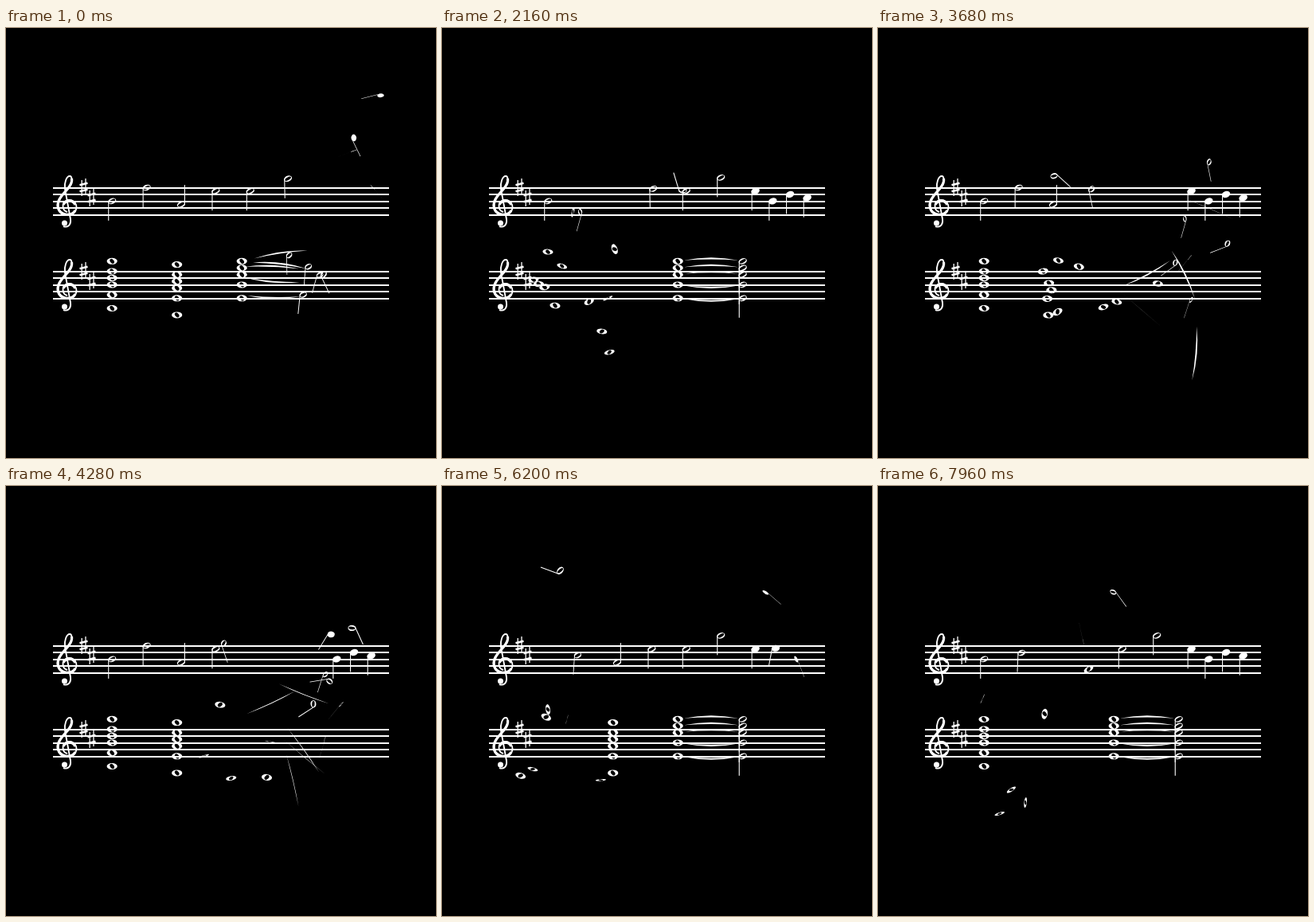
Write an HTML page with a canvas that moves like this. It is 540 by 540 pixels and loops after 8 s.

```html
<!DOCTYPE html>
<html lang="en">
<head>
<meta charset="utf-8">
<title>Scattering score</title>
<style>
  html, body { margin: 0; width: 100%; height: 100%; overflow: hidden; background: #000; }
  canvas { display: block; }
</style>
</head>
<body>
<canvas id="stage" width="540" height="540"></canvas>
<script>
const ctx = document.getElementById('stage').getContext('2d');
const LOOP = 8000, FRAME = 40;
const CYCLE = 5333, SLOT = CYCLE / 8, FIRST_LEAVE = 150;   // one pass over the two bars
const LEFT = 133.2, SLOT_WIDTH = 43.4, CHORD_WIDTH = 81.5;
const LINE_GAP = 8.45, STAFF_DROP = 105, MIDDLE = 217.4;
const parts = [];

function random(seed) {
  const v = Math.sin(seed * 127.1 + 11.7) * 43758.5453;
  return v - Math.floor(v);
}
const spread = (seed, range) => (random(seed) * 2 - 1) * range;
const stepY = (step, drop = 0) => MIDDLE + drop - step * LINE_GAP / 2;

// Parts without a drift [dx, dy, degrees] get a seeded one for each cycle.
function addPart(draw, x, y, leave, duration, reach, { turn = 0, drift } = {}) {
  parts.push({ draw, x, y, leave, duration, reach, turn, drift, id: parts.length + 1 });
}

// Quick burst outwards, a curl, one or two tumbles and a soft landing.
function poseAt({ x, y, leave, duration, reach, turn, drift, id }, time) {
  const cycle = Math.floor((time - leave) / CYCLE);
  const u = (time - leave - cycle * CYCLE) / duration;
  if (u >= 1) return [x, y, turn, 1];
  const seed = id * 3.7 + cycle * 41;
  const [dx, dy, lean] = drift ||
    [spread(seed, reach), spread(seed + .2, reach), spread(seed + .4, 100)];
  const progress = 1 - (1 - u) ** 1.6;
  const out = Math.sin(Math.PI * progress);
  const curl = Math.sin(2 * Math.PI * progress);
  const tumbles = random(seed + .6) < .5 ? 1 : 2;
  return [
    x + dx * out + spread(seed + .7, 30) * curl,
    y + dy * out + spread(seed + .8, 30) * curl,
    turn + lean * out,
    Math.cos(2 * Math.PI * tumbles * progress)
  ];
}

function oval(rx, ry, tilt) {
  ctx.moveTo(rx * Math.cos(tilt), rx * Math.sin(tilt));
  ctx.ellipse(0, 0, rx, ry, tilt, 0, Math.PI * 2);
}

function head(...ovals) {
  ctx.beginPath();
  for (const shape of ovals) oval(...shape);
  ctx.fill('evenodd');
}

function half(squash) {
  ctx.scale(squash, 1);
  head([5.3, 3.6, -.35], [4.4, 1.8, -.5]);
  ctx.fillRect(-5, 0, 1.1, 24.5);
}

function quarter(squash) {
  ctx.scale(squash, 1);
  head([5.4, 4, -.35]);
  ctx.fillRect(-5, 0, 1.1, 24.5);
}

function whole(squash) {
  ctx.scale(1, squash);
  head([6.6, 4, 0], [3.4, 2.3, .9]);
}

const tie = bulge => squash => {
  ctx.scale(1, squash);
  ctx.beginPath();
  ctx.moveTo(-34, 0);
  ctx.quadraticCurveTo(0, 7 * bulge, 34, 0);
  ctx.quadraticCurveTo(0, 2.8 * bulge, -34, 0);
  ctx.fill();
};

function melody(draw, slot, step, drift, turn = 0) {
  addPart(draw, LEFT + slot * SLOT_WIDTH, stepY(step),
    FIRST_LEAVE + slot * SLOT, 2000, 0, { turn, drift });
}

// Chords come apart from the lowest note upwards.
function chord(draw, column, steps, leave, duration, reach) {
  steps.forEach((step, i) => addPart(draw, LEFT + column * CHORD_WIDTH,
    stepY(step, STAFF_DROP), leave + (steps.length - 1 - i) * 50, duration, reach));
}

melody(half, 0, 0, [15, -112, 110]);
melody(half, 1, 4, [0, 110, 31]);
melody(half, 2, -1, [80, -20, -17], 180);
melody(half, 3, 3, [45, -60, -40]);
melody(half, 4, 3, [-90, -20, -50]);
melody(half, 5, 7, [95, -15, -25]);
melody(quarter, 6, 3, [70, -95, 100]);
melody(quarter, 6.5, 0, [62, -130, 79]);
melody(quarter, 7, 2, [45, -10, -45]);
melody(quarter, 7.5, 1, [-40, -120, -60]);

const heldSteps = [7, 5, 3, 0, -4];
[[7, 4, 2, 0, -3, -7], [6, 3, 1, -1, -4, -9], heldSteps].forEach((steps, column) =>
  chord(whole, column, steps, FIRST_LEAVE + column * 2 * SLOT, 2250, 85));
chord(half, 3, heldSteps, 2817, 3150, 70);
heldSteps.forEach((step, i) => {
  const bulge = step > 0 ? -1 : 1;
  addPart(tie(bulge), 338, stepY(step, STAFF_DROP) + bulge, 3000 - 40 * i, 2700, 95);
});

const clefLine = new Path2D('M77 231C70 229 69 218 78 216C86 215 91 223 87 230C83 237 68 236 65 226' +
  'C62 214 74 207 79 200C84 193 83 186 80 186C76 186 73 194 74 202L81 240C82 248 77 251 72 249');
const clefBody = new Path2D('M87 229C83 237 68 236 65.5 226C63 215 74 207 79 200C82 196 83 192 82.5 189' +
  'M72 222C74 217 83 214 87 222');

function sharp(x, y) {
  ctx.lineWidth = 1.3;
  ctx.beginPath();
  ctx.moveTo(x - 2.3, y - 9); ctx.lineTo(x - 2.3, y + 11);
  ctx.moveTo(x + 2.5, y - 11); ctx.lineTo(x + 2.5, y + 9);
  ctx.stroke();
  ctx.lineWidth = 2.6;
  ctx.beginPath();
  for (const dy of [-4, 4]) {
    ctx.moveTo(x - 5, y + dy + 1.3);
    ctx.lineTo(x + 5, y + dy - 1.3);
  }
  ctx.stroke();
}

function staff(drop) {
  ctx.save();
  ctx.translate(0, drop);
  for (let i = -2; i <= 2; i++) {
    ctx.fillRect(59, Math.round(MIDDLE - .8 + i * LINE_GAP), 422, 2);
  }
  ctx.lineWidth = 1.9;
  ctx.stroke(clefLine);
  ctx.lineWidth = 3.2;
  ctx.stroke(clefBody);
  ctx.beginPath();
  ctx.arc(73.5, 245, 3.5, 0, 7);
  ctx.fill();
  sharp(97.5, 200);
  sharp(107.5, 213);
  ctx.restore();
}

function render(time) {
  ctx.fillStyle = '#000';
  ctx.fillRect(0, 0, 540, 540);
  ctx.fillStyle = ctx.strokeStyle = '#fff';
  staff(0);
  staff(STAFF_DROP);
  for (const part of parts) {
    const [x, y, degrees, squash] = poseAt(part, time);
    ctx.save();
    ctx.translate(x, y);
    ctx.rotate(degrees * Math.PI / 180);
    part.draw(squash);
    ctx.restore();
  }
}

const begin = performance.now();
function tick() {
  const time = (performance.now() - begin) % LOOP;
  render(time - time % FRAME);
  requestAnimationFrame(tick);
}
tick();
</script>
</body>
</html>
```
